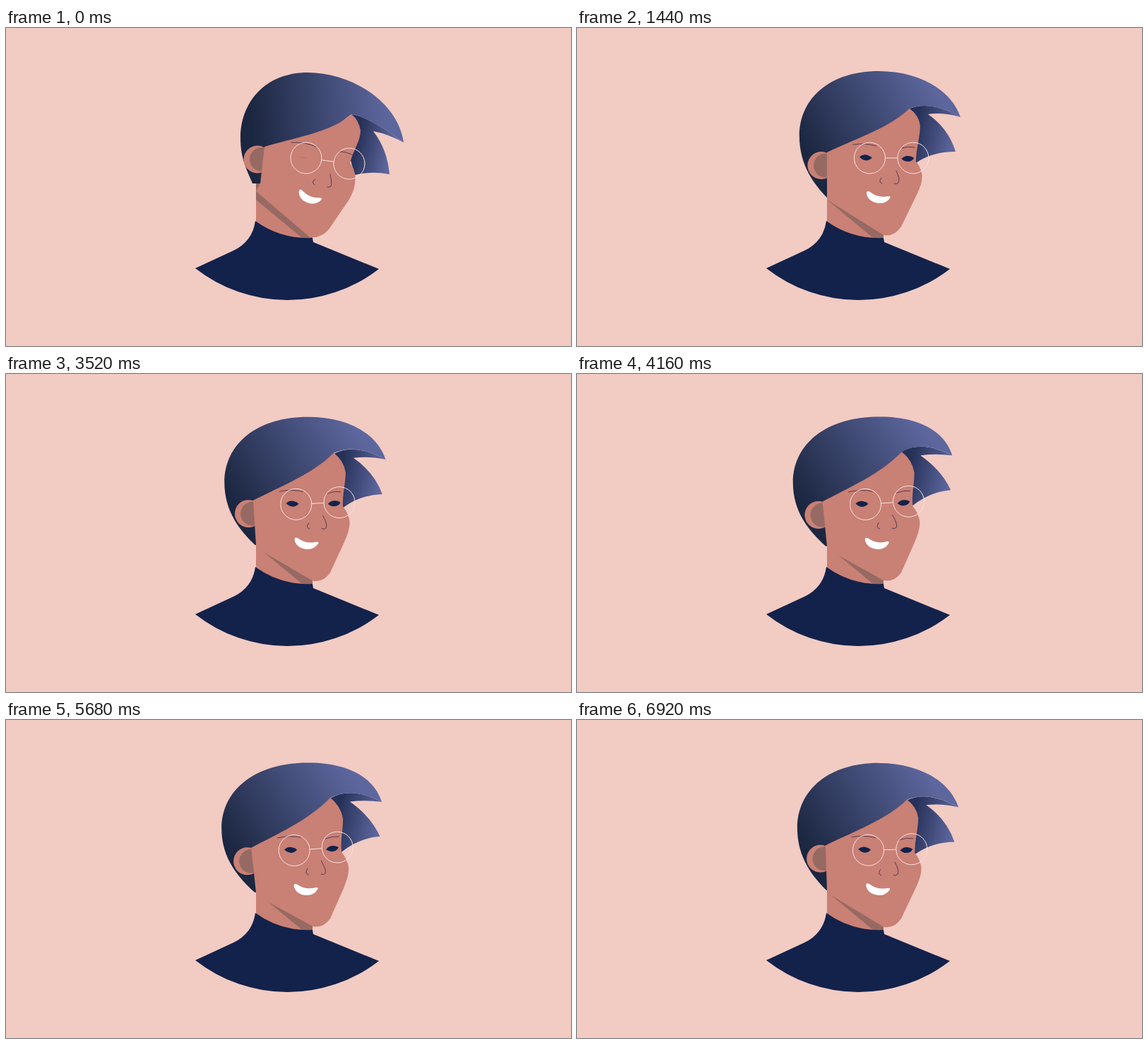
These frames come from a looping animation (800x450 px, 6.96 s). An HTML page:

```html
<!DOCTYPE html>
<html lang="en">
<head>
<meta charset="utf-8">
<style>
  html, body { margin: 0; width: 100%; height: 100%; overflow: hidden; background: #f2cbc3; }
  svg { display: block; width: 100%; height: 100%; }
  .skin { fill: #c98075; }
  .shade { fill: #966a63; }
  .navy { fill: #13224b; }
  .line { fill: none; stroke: #3b2b4a; stroke-width: .8; stroke-linecap: round; }
  .rim { fill: none; stroke: #f7e3de; stroke-width: 1; }
</style>
</head>
<body>
<svg viewBox="0 0 800 450">
  <defs>
    <linearGradient id="capFill" gradientUnits="userSpaceOnUse">
      <stop offset="0" stop-color="#1b2640"/><stop offset="1" stop-color="#5d679e"/>
    </linearGradient>
    <linearGradient id="lockFill" gradientUnits="userSpaceOnUse">
      <stop offset="0" stop-color="#263158"/><stop offset="1" stop-color="#5d669d"/>
    </linearGradient>
  </defs>
  <path class="skin" d="M354 205H434V310H354Z"/>
  <path class="shade" d="M354 215V243L418 296L434 300V250Z"/>
  <path class="navy" d="M268 340L322 315Q349 302 353 273Q389 299 434 297L435 303L528 341A212 212 0 0 1 268 340Z"/>
  <path id="lock" fill="url(#lockFill)"/>
  <path id="cap" fill="url(#capFill)"/>
  <circle id="ear" class="skin" r="19.5"/>
  <circle id="earShade" class="shade" r="17"/>
  <path id="face" class="skin"/>
  <path id="brows" class="line"/>
  <path id="nose" class="line"/>
  <path id="eyeL" class="navy" d="M-9 -1Q-4 -5 1 -4Q6 -3 9 0Q5 4 0 4Q-6 3 -9 -1Z"/>
  <path id="eyeR" class="navy" d="M-9 0Q-5 -4 0 -4Q5 -4 9 -1Q6 4 0 4Q-5 4 -9 0Z"/>
  <path id="mouth" fill="#fff" d="M-17 -6Q-17 -11 -12 -8Q-1 1 14 -2Q18 -2 16 1Q10 9 0 8Q-15 6 -17 -6Z"/>
  <circle id="rimL" class="rim" r="22"/>
  <circle id="rimR" class="rim" r="22"/>
  <path id="bridge" class="rim"/>
</svg>
<script>
const LOOP = 6960, STEP = 40, LAG = 80;
const el = id => document.getElementById(id);

// Each part has three poses: turned back, settled, leaning forward.
const poses = {
  capFront: [
    "M427 60.5C478 60 519 77 531 115Q488 93 ",
    "M427 61C480 61 528 84 543 126Q501 102 ",
    "M427 63C490 63 555 105 563 162Q513 125 "],
  capBack: [
    "459 110L354 244L352 244C329 223 305 196 305 154C305 98 354 60.5 427 60.5Z",
    "471 114L354 240L353 239C337 222 315 195 315 153C315 98 360 61 427 61Z",
    "489 122L360 220L349 220C341 200 332 185 332 156C332 104 368 63 427 63Z"],
  lock: [
    "M459 110Q488 93 531 115Q508 112 486 115Q516 136 529 164Q500 166 474 187L455 150Z",
    "M471 114Q501 102 543 126Q518 119 497 122Q526 142 536 175Q503 175 480 191L465 150Z",
    "M489 122Q513 125 563 162Q541 150 520 146Q540 172 543 207Q518 202 494 208L480 160Z"],
  face: [
    "M347 181C383 162 428 142 459 110Q474 122 477 140C477 156 473 170 475 187Q481 194 484 204Q488 214 478 238L459 281Q449 295 434 292L354 248Z",
    "M354 176C390 158 440 143 471 114Q484 123 486 138C486 154 480 172 480 189Q485 194 488 205Q491 216 481 236L459 281Q449 296 434 293L354 243Z",
    "M366 168C400 157 462 148 489 122Q499 129 502 145C502 160 492 172 487 191Q492 197 494 206Q497 225 485 244L457 285Q446 298 430 296L354 231L360 220Z"],
  brows: [
    "M384 167Q402 163 418 166M452 168Q462 164 471 165",
    "M391 165Q408 162 424 167M460 170Q469 167 478 169",
    "M404 162Q424 161 439 168M473 175Q483 175 491 180"],
  nose: [
    "M427 210Q422 217 428 219M446 199Q454 212 452 217Q449 220 446 218",
    "M431 212Q426 218 432 220M452 202Q458 214 455 219Q452 222 449 220",
    "M438 214Q431 218 437 222M459 207Q462 221 460 224Q457 226 455 225"],
};
// x, y, and a tilt in degrees where needed
const spots = {
  ear: [[341.5, 200], [346, 194.5], [356, 186]],
  earShade: [[347, 200], [352, 194.5], [362, 186]],
  eyeL: [[403, 184, -2], [409, 183.5, 2], [419, 183, 8]],
  eyeR: [[462, 182, -7], [468.5, 185, 0], [479, 191, 8]],
  mouth: [[425, 240, -4], [427, 240, 0], [430.5, 240, 9]],
  rimL: [[408, 184.5], [414.5, 184], [425, 184]],
  rimR: [[469, 180], [476, 184], [486, 192]],
};
const fills = {
  capFill: [[320, 190, 490, 78], [330, 185, 505, 80], [345, 125, 540, 105]],
  lockFill: [[470, 128, 528, 140], [481, 130, 538, 142], [496, 160, 546, 172]],
};
// time, turn: 0, 1 and 2 are the three poses
const turns = [[0, 2], [700, .38], [1380, 1], [2180, 0], [3080, .83], [3980, 0],
  [4880, .83], [5780, 0], [6680, .83], [7580, 0]];

const ease = x => (1 - Math.cos(Math.PI * Math.min(1, Math.max(0, x)))) / 2;

function turnAt(t) {
  t = Math.max(0, t);
  const i = turns.findIndex(k => k[0] > t);
  const [t0, a] = turns[i - 1], [t1, b] = turns[i];
  return a + (b - a) * ease((t - t0) / (t1 - t0));
}

function mix(list, u) {
  const i = u > 1 ? 1 : 0, f = u - i;
  return list[i].map((a, n) => a + (list[i + 1][n] - a) * f);
}

const numbers = s => s.match(/[\d.]+/g).map(Number);
const parsed = {};
for (const id in poses) parsed[id] = poses[id].map(numbers);

function shape(id, u) {
  // The last pose of the face has one extra corner near the ear.
  if (id === "face") return faceShape(u);
  const v = mix(parsed[id], u);
  let n = 0;
  return poses[id][0].replace(/[\d.]+/g, () => v[n++].toFixed(2));
}

function faceShape(u) {
  const v = mix(parsed.face, u);
  const [cx, cy] = mix([[354, 244], [354, 240], [360, 220]], u);
  let n = 0;
  return poses.face[0].replace(/[\d.]+/g, () => v[n++].toFixed(2))
    .replace("Z", `L${cx} ${cy}Z`);
}

function draw(t) {
  const u = turnAt(t), late = turnAt(t - LAG);
  el("cap").setAttribute("d", shape("capFront", late) + shape("capBack", u));
  el("lock").setAttribute("d", shape("lock", late));
  for (const id of ["face", "brows", "nose"]) el(id).setAttribute("d", shape(id, u));

  const open = ease((t - 160) / 400);
  for (const id in spots) {
    const [x, y, tilt = 0] = mix(spots[id], u);
    const blink = id.startsWith("eye") ? ` scale(1 ${open})` : "";
    el(id).setAttribute("transform", `translate(${x} ${y}) rotate(${tilt})${blink}`);
  }

  const [lx, ly] = mix(spots.rimL, u), [rx, ry] = mix(spots.rimR, u);
  const k = 22 / Math.hypot(rx - lx, ry - ly), dx = (rx - lx) * k, dy = (ry - ly) * k;
  el("bridge").setAttribute("d", `M${lx + dx} ${ly + dy}L${rx - dx} ${ry - dy}`);

  for (const id in fills)
    mix(fills[id], u).forEach((v, n) => el(id).setAttribute(["x1", "y1", "x2", "y2"][n], v));
}

const start = performance.now();
function tick() {
  const t = (performance.now() - start) % LOOP;
  draw(Math.floor(t / STEP) * STEP);
  requestAnimationFrame(tick);
}
tick();
</script>
</body>
</html>
```
